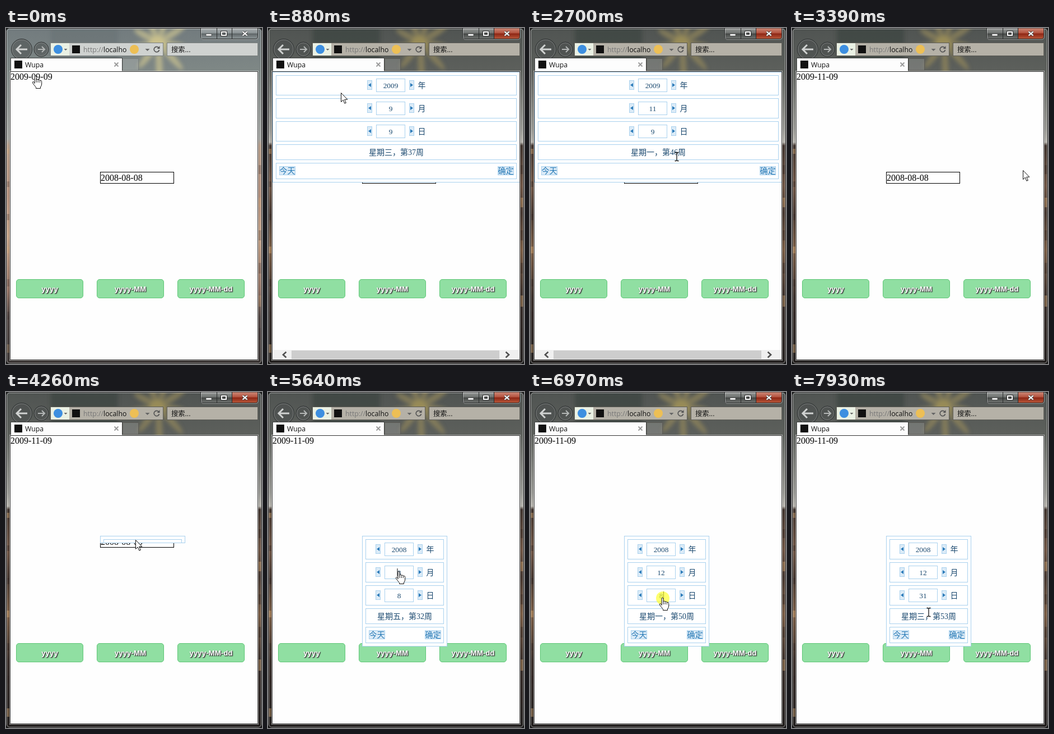
An HTML page that plays this animation: 457 px wide and 598 px high, repeating every 8 s.

```html
<!DOCTYPE html>
<html lang="zh-CN">
<head>
<meta charset="utf-8">
<title>Date picker</title>
<style>
html, body { margin: 0; width: 100%; height: 100%; overflow: hidden; background: #222; }
svg { display: block; }
text { white-space: pre; }
.ui { font: 12.3px "Open Sans", "Noto Sans CJK SC", "Noto Sans CJK JP", sans-serif; }
.date { font: 16px "Liberation Serif", serif; }
.zh { font: 300 14px "Liberation Serif", "Noto Sans CJK SC", "Noto Sans CJK JP", "Noto Sans CJK", sans-serif; fill: #1c4a70; text-anchor: middle; }
.num { font-size: 13.33px; }
.btn { font: bold 13.33px "Liberation Sans", Arial, sans-serif; fill: #fff; text-anchor: middle; text-shadow: 1px 1px 2px #333, 1px 1px 1px #444; }
.line { fill: #fff; stroke: #a9d1ee; }
</style>
</head>
<body>
<svg id="stage" width="457" height="598" viewBox="0 0 457 598">
  <defs>
    <linearGradient id="idleBack" x2="0" y2="1">
      <stop offset="0" stop-color="#727b7e"/><stop offset=".13" stop-color="#7f8886"/>
      <stop offset=".33" stop-color="#a2a4a1"/><stop offset=".35" stop-color="#b39a86"/>
      <stop offset=".5" stop-color="#b08c79"/><stop offset=".62" stop-color="#c2a084"/>
      <stop offset=".78" stop-color="#8d6c5e"/><stop offset=".86" stop-color="#4b403d"/>
      <stop offset="1" stop-color="#383332"/>
    </linearGradient>
    <linearGradient id="liveBack" x2="0" y2="1">
      <stop offset="0" stop-color="#505452"/><stop offset=".13" stop-color="#5d605c"/>
      <stop offset=".3" stop-color="#969691"/><stop offset=".34" stop-color="#b2b0a9"/>
      <stop offset=".35" stop-color="#3c302a"/><stop offset=".47" stop-color="#6b5140"/>
      <stop offset=".55" stop-color="#41332c"/><stop offset=".66" stop-color="#755840"/>
      <stop offset=".8" stop-color="#352a26"/><stop offset="1" stop-color="#211e1d"/>
    </linearGradient>
    <linearGradient id="glass" x2="0" y2="1">
      <stop offset="0" stop-color="#fff" stop-opacity=".42"/><stop offset=".48" stop-color="#fff" stop-opacity=".16"/>
      <stop offset=".5" stop-color="#000" stop-opacity=".22"/><stop offset="1" stop-color="#fff" stop-opacity=".14"/>
    </linearGradient>
    <linearGradient id="red" x2="0" y2="1">
      <stop offset="0" stop-color="#cf8a78"/><stop offset=".48" stop-color="#b2503c"/>
      <stop offset=".5" stop-color="#8c2413"/><stop offset="1" stop-color="#b8573a"/>
    </linearGradient>
    <filter id="soft" x="-50%" y="-50%" width="200%" height="200%"><feGaussianBlur stdDeviation="3.5"/></filter>
    <clipPath id="page"><rect x="8" y="78" width="441" height="512"/></clipPath>
    <clipPath id="fold"><rect id="foldBox"/></clipPath>
  </defs>
  <rect width="457" height="598" fill="#1b1b1b"/>
  <g id="back"></g>
  <g id="chrome"></g>
  <g id="content" clip-path="url(#page)"></g>
  <g id="pointer"></g>
</svg>
<script>
const LOOP = 8000;
const $ = id => document.getElementById(id);
const attrs = o => Object.entries(o).map(([k, v]) => ` ${k}="${v}"`).join('');
const rect = (x, y, width, height, more = {}) => `<rect${attrs({ x, y, width, height, ...more })}/>`;
const path = (d, more = {}) => `<path${attrs({ d, ...more })}/>`;
const text = (x, y, s, cls, more = {}) => `<text${attrs({ x, y, class: cls, ...more })}>${s}</text>`;
const circle = (cx, cy, r, more = {}) => `<circle${attrs({ cx, cy, r, ...more })}/>`;
const range = n => [...Array(n).keys()];
const at = (list, t) => list.filter(e => e[0] <= t).pop();

// Window frame: translucent until the first click, then active

function drawBack(live) {
  const petal = (a, len, wide) =>
    `<ellipse cx="${len / 2}" rx="${len / 2}" ry="${wide}" transform="translate(272 26) rotate(${a})"/>`;
  const streaks = range(13).map(i => rect(i % 2 ? 451 : 1, 215 + i * 29, 5, 9 + i * 7 % 13,
    { fill: i % 3 ? '#2c2220' : '#d0a36d', opacity: live ? .4 : .25 })).join('');
  return rect(0, 0, 457, 598, { rx: 6, fill: `url(#${live ? 'liveBack' : 'idleBack'})` }) +
    `<g filter="url(#soft)">` +
    rect(80, 0, 120, 76, { fill: live ? '#383f3d' : '#667174', opacity: .55 }) +
    `<g fill="${live ? '#8f855b' : '#c6bf91'}" opacity=".75">` +
    range(9).map(i => petal(i * 40 + 8, 48 + i * 17 % 42, 6)).join('') + '</g>' +
    circle(270, 28, 14, { fill: live ? '#a79756' : '#d9cb8c', opacity: .6 }) + '</g>' + streaks;
}

function drawChrome(live) {
  const field = live ? '#b5b1a7' : '#cfd2d0', edge = live ? '#5c5b56' : '#7b807f';
  const knob = (x, r) => circle(x, 38, r, { fill: '#4b4f4f', 'fill-opacity': .55, stroke: '#303434' }) +
    circle(x, 38, r - 1.5, { fill: 'none', stroke: '#aaa', 'stroke-opacity': .45 });
  const stroke = (d, color, width) => path(d, { fill: 'none', stroke: color, 'stroke-width': width });
  return rect(.5, .5, 456, 597, { rx: 6, fill: 'none', stroke: '#111' }) +
    rect(1.5, 1.5, 454, 595, { rx: 5, fill: 'none', stroke: '#fff', 'stroke-opacity': .55 }) +
    path('M347.5 0V15Q347.5 19.5 352 19.5H376.5V0Z M376.5 0V19.5H403.5V0Z', { fill: 'url(#glass)', stroke: '#292b2b' }) +
    path('M403.5 0V19.5H445Q449.5 19.5 449.5 15V0Z', { fill: live ? 'url(#red)' : 'url(#glass)', stroke: '#292b2b' }) +
    path('M348.5 1V15Q348.5 20.5 352 20.5H445Q450.5 20.5 450.5 15V1', { fill: 'none', stroke: '#fff', 'stroke-opacity': .4 }) +
    rect(357, 10.5, 10, 3.5, { fill: '#fff', stroke: '#444', 'stroke-width': .7 }) +
    rect(385, 7, 8, 6, { fill: 'none', stroke: '#333', 'stroke-width': 4 }) +
    rect(385, 7, 8, 6, { fill: 'none', stroke: '#fff', 'stroke-width': 2 }) +
    stroke('M422.5 6.5l8 7m0-7l-8 7', '#444', 4) + stroke('M422.5 6.5l8 7m0-7l-8 7', '#fff', 2.2) +
    knob(28, 18.5) + knob(63, 13) +
    stroke('M38 38H20M27 30l-8 8l8 8', '#d0d2d1', 3) +
    stroke('M57 38H69M64 33l5 5l-5 5', '#b4b7b6', 2) +
    rect(79.5, 26.5, 201, 23, { fill: field, stroke: edge }) +
    rect(80, 27, 33, 22, { fill: '#eaf1e4' }) +
    circle(93, 38, 8, { fill: '#3d8fe0' }) +
    path('M103.5 37h6l-3 3z M248.500 37h8l-4 4z', { fill: '#666' }) +
    rect(118, 31, 14, 14, { fill: '#111' }) +
    text(138, 43, '<tspan fill="#777">http://</tspan>localho', 'ui', { fill: '#111' }) +
    circle(229, 38, 8, { fill: '#edbf55' }) +
    stroke('M272.500 35a4.700 4.700 0 1 0 1 4', '#555', 1.700) + path('M274.500 32v5h-5z', { fill: '#555' }) +
    rect(287.5, 26.5, 162, 23, { fill: field, stroke: edge }) +
    text(295, 43, '搜索...', 'ui', { fill: '#111' }) +
    rect(208.5, 54.5, 28, 21, { fill: '#fff', 'fill-opacity': .16, stroke: edge }) +
    rect(8.500, 53.500, 199, 24, { fill: '#fdfdfd', stroke: '#3f4241' }) +
    rect(15, 58, 14, 14, { fill: '#111' }) + text(34, 70, 'Wupa', 'ui', { fill: '#111' }) +
    stroke('M193.500 61.500l7 7m0-7l-7 7', '#999', 1.800) +
    rect(6.5, 76.5, 444, 515, { fill: 'none', stroke: '#fff', 'stroke-opacity': .5 }) +
    rect(7.5, 77.5, 442, 513, { fill: '#fefefe', stroke: '#333' }) +
    rect(9, 75, 198, 2, { fill: '#fdfdfd' });
}

// Picker panels

const panels = [{ x: 8, y: 78, w: 442 }, { x: 168, y: 256, w: 152 }];
const FULL = 197, GRID = 152;
const monthNames = [...'一二三四五六七八九十', '十一', '十二'].map(n => n + '月');
const weekDays = [...'日一二三四五六'];

// time, panel, view, height, year, month, day, caret offset
const scenes = [
  [0],
  [400, 0, 'form', 100, 2009, 9, 9], [480, 0, 'form', FULL, 2009, 9, 9],
  [1130, 0, 'form', FULL, 2009, 9, 9, -6], [1210, 0, 'months', GRID, 2009, 9, 9],
  [2300, 0, 'form', FULL, 2009, 11, 9],
  [3390],
  [4260, 1, 'form', 13, 2008, 8, 8], [4340, 1, 'form', 115, 2008, 8, 8], [4430, 1, 'form', FULL, 2008, 8, 8],
  [5560, 1, 'form', FULL, 2008, 8, 8, -13.5], [5710, 1, 'months', GRID, 2008, 8, 8],
  [6500, 1, 'form', FULL, 2008, 12, 8],
  [6970, 1, 'form', FULL, 2008, 12, 8, -6], [7040, 1, 'days', 155, 2008, 12, 8],
  [7710, 1, 'form', FULL, 2008, 12, 31]
];

// time, x, y, shape, click glow
const moves = [
  [0, 53, 86, 'hand'], [230, 53, 86, 'hand', 1], [400, 51, 86, 'arrow'],
  [880, 130, 115, 'arrow'], [960, 201, 140, 'hand'], [1130, 201, 140, 'hand', 1], [1210, 201, 140, 'hand'],
  [1420, 213, 150, 'hand'], [1500, 230, 175, 'hand'], [1600, 236, 183, 'hand'],
  [1770, 228, 206, 'hand'], [1830, 221, 222, 'hand'], [2150, 221, 222, 'hand', 1], [2300, 224, 223, 'beam'],
  [2700, 262, 229, 'beam'], [2770, 335, 241, 'arrow'], [2850, 393, 250, 'arrow'], [2920, 412, 253, 'hand'],
  [3070, 412, 253, 'hand', 1], [3140, 412, 253, 'hand'], [3390, 412, 253, 'arrow'],
  [3620, 368, 256, 'arrow'], [3700, 300, 261, 'arrow'], [3790, 248, 263, 'beam'], [3870, 231, 263, 'beam'],
  [4090, 231, 263, 'beam', 1], [4260, 231, 263, 'arrow'],
  [4870, 232, 266, 'arrow'], [4950, 233, 275, 'hand'], [5030, 233, 288, 'hand'], [5100, 233, 300, 'arrow'],
  [5180, 233, 308, 'arrow'], [5330, 234, 315, 'hand'], [5410, 234, 320, 'hand'],
  [5560, 234, 320, 'hand', 1], [5640, 234, 320, 'hand'],
  [5960, 246, 336, 'hand'], [6040, 262, 358, 'hand'], [6110, 275, 384, 'hand'], [6190, 280, 397, 'hand'],
  [6420, 280, 397, 'hand', 1], [6500, 280, 397, 'beam'],
  [6650, 262, 384, 'arrow'], [6740, 243, 372, 'hand'], [6820, 237, 367, 'hand'],
  [6970, 237, 367, 'hand', 1], [7040, 237, 367, 'hand'],
  [7210, 240, 377, 'hand'], [7290, 245, 387, 'hand'], [7380, 249, 396, 'hand'], [7460, 251, 401, 'hand'],
  [7610, 251, 401, 'hand', 1], [7710, 251, 401, 'beam'], [7930, 244, 392, 'beam']
];

function weekLabel(y, m, d) {
  const first = new Date(Date.UTC(y, 0, 1)), day = new Date(Date.UTC(y, m - 1, d));
  const nth = (day - first) / 864e5 + 1;
  const week = Math.ceil((nth + (first.getUTCDay() + 6) % 7) / 7);
  return `星期${weekDays[day.getUTCDay()]}，第${week}周`;
}

function drawForm({ x, y, w }, date, caret, focus, pressed) {
  const mid = x + w / 2;
  const row = (dy, h) => rect(x + 6.5, y + dy + .5, w - 13, h - 1, { class: 'line' });
  const tint = { fill: '#dcebf7', stroke: '#a9d1ee' };
  const spin = (value, i) => {
    const top = y + 6 + i * 41;
    return row(6 + i * 41, 36) +
      rect(mid - 51.5, top + 9.5, 8, 16, tint) + rect(mid + 23.5, top + 9.5, 8, 16, tint) +
      path(`M${mid - 45} ${top + 14}v7l-5-3.5z M${mid + 25} ${top + 14}v7l5-3.5z`, { fill: '#2a7ab9' }) +
      rect(mid - 35.5, top + 6.5, 51, 23, { class: 'line' }) +
      text(mid - 10, top + 22.5, value, 'zh num') +
      (caret !== undefined && i === focus ? rect(mid + caret, top + 11, 1, 14, { fill: '#111' }) : '') +
      text(mid + 45.5, top + 23, '年月日'[i], 'zh');
  };
  const action = (left, label, style) => rect(left + .5, y + 168.5, 28, 15, style) +
    text(left + 14.5, y + 181, label, 'zh', { style: 'fill:#2478b5' });
  return date.map(spin).join('') + row(129, 28) + text(mid, y + 147.5, weekLabel(...date), 'zh') +
    row(162, 29) + action(x + 12, '今天', tint) +
    action(x + w - 40, '确定', pressed ? { ...tint, fill: '#c4dff3' } : tint);
}

// Cells hold [label, state]; hover only follows a moved pointer
function drawGrid({ x, y, w }, labels, cols, rowH, chosen, pointer) {
  const cw = (w - 2) / cols;
  return labels.map((label, i) => {
    const cx = x + 1 + i % cols * cw, cy = y + 1 + Math.floor(i / cols) * rowH;
    const over = pointer && label && pointer[1] >= cx && pointer[1] < cx + cw &&
      pointer[2] >= cy && pointer[2] < cy + rowH;
    const fill = i === chosen ? '#dcebf7' : over ? '#eaf3fb' : '#fff';
    return rect(Math.round(cx) - .5, Math.round(cy) - .5, Math.round(cw), Math.round(rowH), { fill, stroke: '#a9d1ee' }) +
      text(cx + cw / 2, cy + rowH / 2 + 4.5, label, cols > 3 ? 'zh num' : 'zh');
  }).join('');
}

function drawPanel(scene, move) {
  const [start, index, view, h, year, month, day, caret] = scene;
  const box = panels[index], pointer = move[0] > start && move;
  let body;
  if (view === 'form') {
    const focus = month === 12 ? 2 : 1;
    body = drawForm(box, [year, month, day], caret, focus, move[0] === 3070);
  } else if (view === 'months') {
    body = drawGrid(box, monthNames, 3, 37.6, month - 1, pointer);
  } else {
    const lead = new Date(Date.UTC(year, month - 1, 1)).getUTCDay();
    const days = range(35).map(i => i >= lead && i < lead + 31 ? i - lead + 1 : '');
    body = drawGrid(box, [...weekDays, ...days], 7, 25.5, 6 + lead + day, pointer);
  }
  Object.entries({ x: box.x, y: box.y, width: box.w, height: h }).forEach(([k, v]) => $('foldBox').setAttribute(k, v));
  return rect(box.x + .5, box.y + .5, box.w - 1, h - 1, { class: 'line' }) +
    `<g clip-path="url(#fold)">${body}</g>` +
    rect(box.x + .5, box.y + .5, box.w - 1, h - 1, { fill: 'none', stroke: '#a9d1ee' });
}

function drawPage(t, scene, move) {
  const button = (label, i) => rect(18.5 + i * 144, 447.5, 119, 33, { rx: 4.5, fill: '#90dfa2', stroke: '#5fc677' }) +
    text(78 + i * 144, 468.5, label, 'btn');
  const scrollbar = rect(8, 573, 441, 17, { fill: '#f0f0f0' }) + rect(42, 574, 371, 15, { fill: '#cdcdcd' }) +
    path('M32.500 576.500l-5.500 5l5.500 5M424.500 576.500l5.500 5l-5.500 5', { fill: 'none', stroke: '#505050', 'stroke-width': 2.600 });
  return text(8, 92, t < 3390 ? '2009-09-09' : '2009-11-09', 'date') +
    rect(168.5, 256.5, 131, 20, { fill: '#fff', stroke: '#000' }) + text(169, 272, '2008-08-08', 'date') +
    ['yyyy', 'yyyy-MM', 'yyyy-MM-dd'].map(button).join('') +
    (scene[1] === 0 ? scrollbar : '') + (scene.length > 1 ? drawPanel(scene, move) : '');
}

const shapes = {
  hand: path('M-2 13V1Q-2-.8-.5-.8Q1-.8 1 1V6.500Q1 5 2.600 5T4.200 7Q4.300 6 5.800 6T7.400 8Q7.600 7.200 9 7.300T10.700 9.500V14Q10.500 17 8.500 19V21.500H.5V19.500Q-2.500 16-5.300 12Q-6.300 9.600-4.500 9.500Q-3 9.800-2 12M1 6.500V11M4.200 7.500V11M7.400 8.500V11',
    { fill: '#fff', stroke: '#111', 'stroke-linejoin': 'round' }),
  arrow: path('M.5.5V16.500L4.200 13L6.800 19.200L9.300 18.200L6.700 12.200H11.800Z', { fill: '#fff', stroke: '#111' }),
  beam: path('M-3.500-7.500H-1.500L0-6.500L1.500-7.500H3.500M-3.500 7.500H-1.500L0 6.500L1.500 7.500H3.500M0-6.500V6.500', { fill: 'none', stroke: '#111', 'stroke-width': 1.300 })
};

function drawPointer([, x, y, shape, glow]) {
  return (glow ? circle(x, y, 12, { fill: '#ffff20', opacity: .65 }) : '') +
    `<g transform="translate(${x} ${y})">${shapes[shape]}</g>`;
}

let shown = '', wasLive;
function render(t) {
  const scene = at(scenes, t), move = at(moves, t), live = t >= 230;
  const key = scene[0] + '/' + move[0];
  if (key === shown) return;
  shown = key;
  if (live !== wasLive) {
    wasLive = live;
    $('back').innerHTML = drawBack(live);
    $('chrome').innerHTML = drawChrome(live);
  }
  $('content').innerHTML = drawPage(t, scene, move);
  $('pointer').innerHTML = drawPointer(move);
}

const begin = performance.now();
function tick() {
  render((performance.now() - begin) % LOOP);
  requestAnimationFrame(tick);
}
tick();
</script>
</body>
</html>
```
